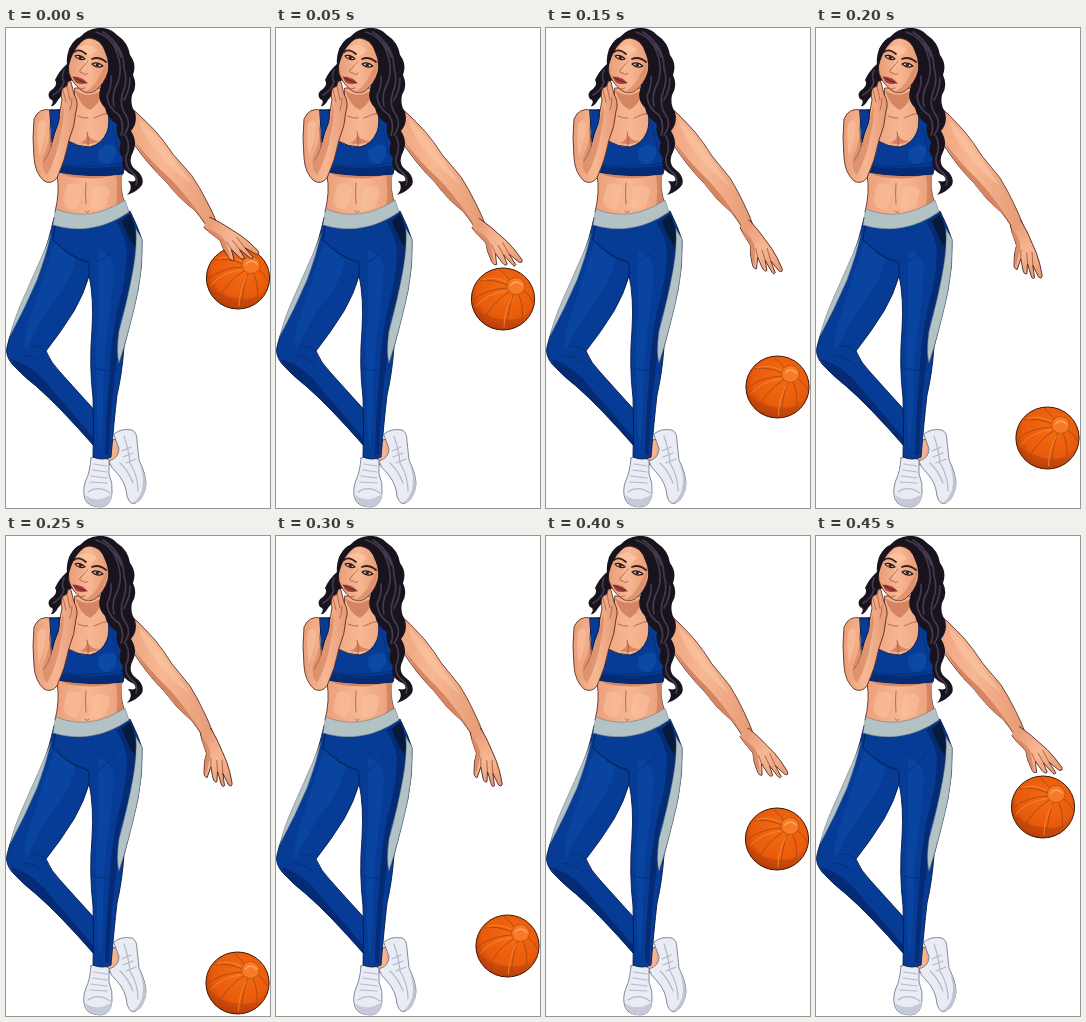
Recreate the animation shown at these times as an HTML page. Size 264 by 480 pixels, loop 0.5 s.

```html
<!DOCTYPE html>
<html lang="en">
<head>
<meta charset="utf-8">
<title>Dribble</title>
<style>
  html, body { margin: 0; width: 100%; height: 100%; overflow: hidden; background: #fff; }
  svg { display: block; width: 100vw; height: 100vh; }
  path { stroke-linejoin: round; stroke-linecap: round; }
  .skin { fill: url(#skin); stroke: #4a2018; stroke-width: .8; }
  .shade { fill: #d58561; }
  .glow { fill: #fcc5a2; }
  .crease { fill: none; stroke: #a65b40; stroke-width: .8; }
  .cloth { fill: #063c95; stroke: #051a48; stroke-width: .9; }
  .lit { fill: #0d4ca8; }
  .dark { fill: #052b74; }
  .fold { fill: none; stroke: #062c70; stroke-width: .8; }
  .trim { fill: #b2c2c5; stroke: #5c6c78; stroke-width: .5; }
  .hair { fill: #18131c; }
  .shine { fill: none; stroke: #443a4e; stroke-width: 1.7; }
  .shoe { fill: #e9ecf2; stroke: #777c92; stroke-width: .9; }
  .seam { fill: none; stroke: #b3b8c8; stroke-width: 1.2; }
</style>
</head>
<body>
<svg viewBox="0 0 264 480">
  <defs>
    <linearGradient id="skin">
      <stop offset="0" stop-color="#e99d77"/>
      <stop offset=".5" stop-color="#f7b793"/>
      <stop offset="1" stop-color="#e69a74"/>
    </linearGradient>
    <radialGradient id="orange" cx=".56" cy=".36" r=".66">
      <stop offset="0" stop-color="#f56b12"/>
      <stop offset=".7" stop-color="#e85b0b"/>
      <stop offset="1" stop-color="#ad3908"/>
    </radialGradient>
  </defs>

  <g id="ball">
    <ellipse rx="31.6" ry="31" fill="url(#orange)" stroke="#3f1707"/>
    <path d="M-29 9Q-8 25 22 19Q10 30-4 29Q-22 26-29 9Z" fill="#c0450a" opacity=".6"/>
    <path d="M5-14Q-12-21-23-18M4-11Q-17-10-30 1M6-7Q-12 4-20 23M10-4Q4 12 4 30M16-4Q21 8 19 23M21-8Q27-4 30 3M7-19Q2-25-3-29" fill="none" stroke="#b24a13"/>
    <path d="M5-16Q-10-24-20-19M3-8Q-16-6-27 7M9-2Q1 13 1 28" fill="none" stroke="#f98c3b" stroke-width=".8"/>
    <ellipse cx="13" cy="-13" rx="9" ry="8.5" fill="#f67a27" stroke="#c7520f"/>
    <path d="M8-14Q13-20 19-14" fill="none" stroke="#ffa65f" stroke-width="1.3"/>
  </g>

  <g id="arm">
    <path class="skin" d="M106 82Q124 76 132 86Q141 95 149 104Q158 115 166 128Q176 140 184 150Q192 163 198 176Q203 186 207 197L200 207Q196 198 186 185Q170 172 158 155Q141 138 127 116Z"/>
    <path class="shade" d="M127 112Q143 134 160 150Q176 166 200 203Q193 192 186 185Q170 172 158 155Q141 138 127 112Z"/>
    <path class="glow" d="M133 92Q144 102 152 114Q168 135 184 158Q165 145 150 124Q136 108 133 92Z" opacity=".6"/>
    <g id="hand">
      <path class="skin" d="M-5-6Q8-7 20-6Q31-6 41-4L53-1Q57 1 53 3L40 3L52 7Q53 10 48 9L36 7L45 12Q45 15 40 14L29 11Q34 16 37 19Q35 22 30 19Q21 15 15 9Q5 8-5 6Z"/>
      <path d="M-7-5L-1-5L2 5L-6 5Z" fill="#e99e78"/>
      <path class="crease" d="M28-2L40 3M26 3L36 7M21 7L29 11"/>
      <path class="shade" d="M0 5Q11 3 18 6Q26 12 34 19Q22 16 15 9Q8 8 0 8Z" opacity=".8"/>
    </g>
  </g>

  <g id="shoes">
    <path class="skin" d="M101 413L112 411L115 431L102 437Z"/>
    <path class="shoe" d="M108 406Q115 400 126 402Q131 404 131 413L133 432Q140 446 140 456Q139 468 130 475Q124 478 121 468Q120 455 111 445Q104 439 103 433Q113 430 113 421Z"/>
    <path class="seam" d="M118 408Q123 423 124 435Q132 448 132 463M114 435Q122 442 127 455M116 423L125 419M117 429L127 425M120 435L130 431"/>
    <path d="M133 434Q139 449 136 462Q132 473 126 475Q137 477 140 458Q140 447 133 434Z" fill="#bfc4d2"/>
    <path class="shoe" d="M85 430Q93 427 103 432L103 446Q107 455 106 465Q105 478 95 479Q82 479 79 471Q76 462 80 452Q84 444 85 430Z"/>
    <path class="seam" d="M88 436L101 438M87 442L101 444M85 448L101 450M84 454L101 455M82 464Q92 457 104 465"/>
    <path d="M79 467Q91 476 106 466Q105 479 92 479Q81 478 79 467Z" fill="#c6cad8"/>
  </g>

  <g id="trousers">
    <path class="cloth" d="M48 190Q43 212 37 228L19 272Q4 304 1 319Q-1 327 6 336Q15 346 30 358Q53 378 88 418L92 386Q71 363 54 344Q45 335 40 323Q55 304 68 283Q78 266 84 245L110 205Z"/>
    <path class="lit" d="M48 215Q61 208 70 214Q72 240 54 266Q33 293 20 322Q16 310 25 287Z" opacity=".6"/>
    <path class="dark" d="M5 331Q29 338 47 363Q65 383 89 412L88 418Q57 382 31 359Q13 346 5 331Z"/>
    <path class="fold" d="M25 318Q36 318 40 324M17 327Q32 328 39 338"/>
    <path class="trim" d="M45 206Q40 228 31 252Q19 280 4 308Q8 291 17 271L36 228Z"/>
    <path class="cloth" d="M50 196Q91 207 124 183Q132 199 136 212Q137 237 132 262Q127 285 118 319Q116 346 111 367Q108 393 105 429Q96 433 87 429Q88 400 87 370Q83 337 86 302Q88 270 83 247Q84 240 82 234Q65 230 47 212Z"/>
    <path class="lit" d="M92 222Q105 225 108 241Q106 275 101 306Q97 343 97 385L94 423Q90 397 91 365Q88 324 92 288Z" opacity=".6"/>
    <path class="dark" d="M110 194L124 185Q134 205 130 234Q124 267 114 292Q112 327 107 363Q104 395 103 427L99 427Q100 387 103 352Q105 313 111 283Q121 249 121 222Q118 205 110 194Z"/>
    <path d="M116 193L124 186Q131 200 131 222Q122 211 116 193Z" fill="#071a3c"/>
    <path class="fold" d="M60 224Q70 232 82 234Q84 240 83 247M92 234Q102 229 110 218M88 340Q97 344 111 341"/>
    <path class="trim" d="M130 201L136 211Q137 238 132 263Q127 287 118 319L113 335Q110 324 113 303Q122 270 127 242Q131 220 130 201Z"/>
  </g>

  <g id="torso">
    <path class="skin" d="M69 60L97 60Q98 77 111 82Q125 86 123 111L116 144Q113 160 119 176Q98 196 49 184Q54 164 51 147Q48 122 45 84Q58 81 68 76Z"/>
    <path class="shade" d="M110 147L117 144Q113 162 119 178L109 184Q113 166 110 147ZM52 143Q84 149 115 144Q99 152 77 150Q59 150 52 143Z"/>
    <path class="shade" d="M69 62Q82 72 97 61Q94 76 84 82Q74 78 69 62Z"/>
    <path class="glow" d="M61 157Q71 153 76 160Q74 176 70 182Q58 181 57 172ZM87 160Q99 155 104 163L100 179Q88 185 85 178Z" opacity=".45"/>
    <path class="crease" d="M80 155Q79 166 80 176M79 183Q82 186 83 183M72 88Q78 91 82 90M88 90Q97 85 106 85"/>
    <path class="cloth" d="M45 82L54 82Q56 98 62 113Q72 119 84 119Q96 116 101 104Q104 96 102 84L111 84Q115 104 121 116Q122 132 117 146Q86 150 51 144Q49 124 47 109Z"/>
    <path class="lit" d="M92 122Q104 112 110 120Q112 130 103 136Q91 137 92 122Z" opacity=".8"/>
    <path class="dark" d="M51 137Q84 143 118 137L117 146Q86 150 51 144Z"/>
    <path class="fold" d="M54 136Q83 141 117 135M106 98Q110 110 112 124"/>
    <path class="shade" d="M74 115Q82 112 81 104Q83 113 94 113Q85 118 74 115Z"/>
    <path class="crease" d="M82 118Q83 111 81 104"/>
    <path class="trim" d="M50 181Q84 195 119 172L123 184Q87 209 47 197Z"/>
  </g>

  <g id="head">
    <path class="hair" d="M92 0Q104-1 111 7Q122 14 124 27Q131 36 127 47Q132 58 126 67Q124 77 129 84Q132 95 125 103Q132 114 127 124Q121 135 130 142Q139 149 136 157Q131 164 121 167Q128 159 122 153Q133 155 128 148Q113 142 117 130Q111 124 115 114Q109 106 111 96Q101 90 99 80Q91 72 94 62L98 40L62 54Q61 62 52 72Q48 79 45 78Q49 72 44 71Q40 65 47 61Q52 57 49 52Q53 43 61 36Q63 13 74 9Q81 1 92 0Z"/>
    <path class="shine" d="M90 4Q106 9 111 25Q117 40 112 54Q105 66 108 78M97 4Q118 18 118 40Q122 52 117 64Q112 77 121 89Q125 98 118 107M105 48Q106 58 101 68Q102 80 113 87Q119 97 115 107M120 108Q125 119 120 129Q119 139 126 144Q133 150 130 157M104 13Q113 20 115 29M124 50Q124 62 118 72M58 42Q55 50 58 54Q55 63 47 67M78 9Q69 16 66 26"/>
    <path class="skin" d="M84 10Q95 12 101 22Q105 32 102 44Q98 56 89 63Q82 67 75 62Q66 55 63 45Q61 31 66 21Q73 11 84 10Z"/>
    <path class="shade" d="M102 31Q102 48 90 62Q84 66 79 64Q90 57 94 47Q99 40 102 31Z" opacity=".65"/>
    <path class="glow" d="M72 20Q82 13 91 22Q86 27 82 28ZM79 32L83 33L77 45Z" opacity=".8"/>
    <path d="M68 24Q73 20 80 26M86 31Q93 28 100 34" fill="none" stroke="#39201e" stroke-width="1.8"/>
    <path d="M69 28Q74 26 79 31Q73 33 69 28ZM86 36Q91 33 97 38Q91 41 86 36Z" fill="#e9cfc2" stroke="#241516" stroke-width="1.1"/>
    <circle cx="74.3" cy="29.5" r="1.7" fill="#3a211b"/>
    <circle cx="91.3" cy="37" r="1.7" fill="#3a211b"/>
    <path class="crease" d="M82 33Q78 39 74 42Q73 45 77 45Q80 48 82 45M72 60Q76 62 79 60"/>
    <path d="M67 49Q71 48 74 50Q77 50 81 55Q76 57 71 55Q68 53 67 49Z" fill="#a2403c"/>
    <path d="M67 49Q73 53 81 55" fill="none" stroke="#5e1c23" stroke-width=".9"/>
    <path class="hair" d="M88 6Q77 11 71 19Q65 27 62 42Q59 33 63 21Q70 7 88 6ZM84 8Q95 12 99 24Q105 36 100 52Q112 42 110 26Q104 8 84 8Z"/>
  </g>

  <g id="raised">
    <path class="skin" d="M45 82Q33 79 28 91Q26 109 28 130Q29 145 38 153Q45 157 51 150Q59 133 63 112Q69 98 70 83Q73 75 68 66L65 54Q62 51 61 58L57 60Q54 64 56 72Q54 83 52 94Q48 105 45 119L44 102Z"/>
    <path class="shade" d="M45 119Q48 107 53 94L57 77Q59 87 55 104Q51 130 41 147Q35 141 37 129Q43 116 44 102Z" opacity=".65"/>
    <path class="glow" d="M32 96Q38 88 40 97Q39 112 33 128Q30 113 32 96Z" opacity=".6"/>
    <path class="crease" d="M61 58L64 72M57 62L60 74M45 119Q42 128 38 133M66 70Q66 77 64 82"/>
    <path class="cloth" d="M44 82L53 82Q54 91 52 96Q48 105 46 114Z"/>
  </g>
</svg>

<script>
  const STEP = 50;
  // One pose per step on the way down: ball centre, shoulder turn, hand direction.
  const poses = [
    { x: 232, y: 250, shoulder: -2, hand: 30 },
    { x: 227, y: 271, shoulder: -1, hand: 39 },
    { x: 231, y: 303, shoulder: 0, hand: 43 },
    { x: 231.5, y: 359, shoulder: 0, hand: 51 },
    { x: 231.5, y: 410, shoulder: 0, hand: 64 },
    { x: 231.5, y: 447, shoulder: 0, hand: 64 }
  ];
  const place = (id, transform) => document.getElementById(id).setAttribute('transform', transform);

  function draw() {
    const step = Math.floor(performance.now() / STEP) % 10;
    const { x, y, shoulder, hand } = poses[Math.min(step, 10 - step)];
    place('ball', `translate(${x} ${y})`);
    place('arm', `rotate(${shoulder} 120 95)`);
    place('hand', `translate(202 200) rotate(${hand - shoulder})`);
    requestAnimationFrame(draw);
  }
  draw();
</script>
</body>
</html>
```
